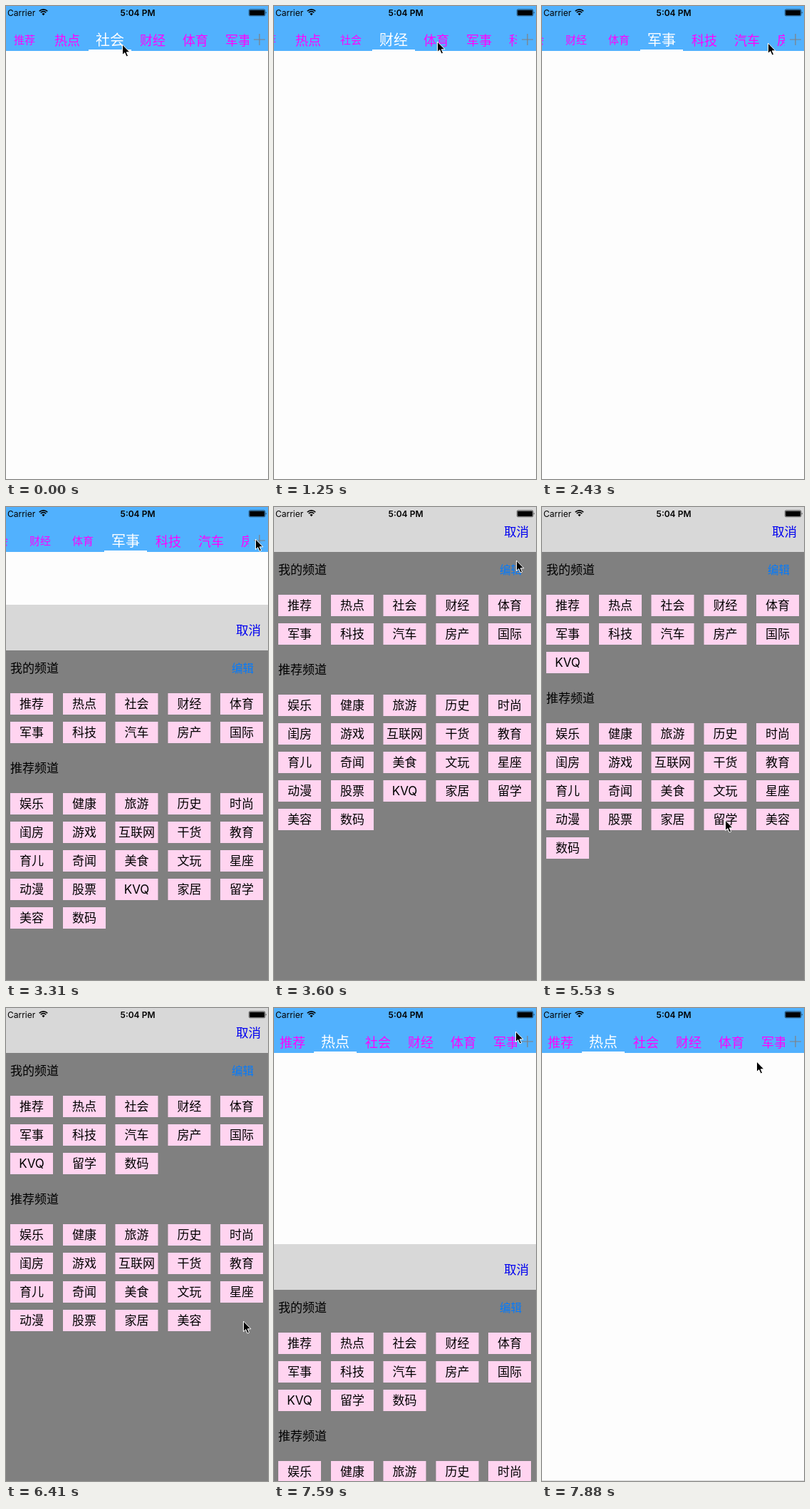
Animation of 368x663 px, one loop 8 s. Source, as an HTML page:

```html
<!DOCTYPE html>
<html lang="zh">
<head>
<meta charset="utf-8">
<style>
  html, body { margin: 0; width: 368px; height: 663px; overflow: hidden; background: #fdfdfd; }
  svg { display: block; }
  text { font-family: Inter, "Noto Sans CJK SC", "Noto Sans CJK", sans-serif; }
</style>
</head>
<body>
<svg id="stage" width="368" height="663" viewBox="0 0 368 663"></svg>
<script>
const LOOP = 8000, FIRST = 210, STEP = 147.5;
const stage = document.getElementById('stage');

const mine = '推荐 热点 社会 财经 体育 军事 科技 汽车 房产 国际'.split(' ');
const others = ('娱乐 健康 旅游 历史 时尚 闺房 游戏 互联网 干货 教育 育儿 奇闻 美食 文玩 星座 ' +
  '动漫 股票 KVQ 家居 留学 美容 数码').split(' ');

// Taps on tabs: [ms, tab]; channels moved up: [ms, name]
const taps = [[-1000, 2], [580, 3], [1330, 4], [1920, 5]];
const moves = [[4900, 'KVQ'], [5640, '留学'], [6230, '数码']];
const OPEN = 3025, CLOSE = 7385, SLIDE = 400, SCROLL = 300;

// Pointer path: [step, x, y]
const path = [
  [-1, 163, 54], [2, 204, 54], [4, 208, 53], [7, 229, 50], [10, 230, 50], [12, 232, 51],
  [15, 317, 52], [18, 350, 45], [21, 350, 45], [23, 340, 75], [27, 220, 330], [30, 191, 401],
  [32, 191, 401], [36, 257, 439], [37, 258, 439], [40, 333, 439], [43, 333, 439],
  [48, 339, 33], [50, 339, 33], [52, 301, 75]
];

const clamp = v => Math.max(0, Math.min(1, v));
const ease = v => { const u = clamp(v); return u * u * (3 - 2 * u); };
const mix = (a, b, u) => a + (b - a) * u;

const rect = (x, y, w, h, fill) =>
  `<rect x="${x}" y="${y}" width="${w}" height="${h}" fill="${fill}"/>`;

// Text centred vertically on y
const label = (str, x, y, size, fill = '#000', anchor = 'middle', weight = 400) =>
  `<text x="${x}" y="${y + size * 0.38}" font-size="${size}" fill="${fill}" ` +
  `text-anchor="${anchor}" font-weight="${weight}">${str}</text>`;

function statusBar() {
  const arc = r => {
    const d = r * 0.72;
    return `<path d="M${52.5 - d} ${13 - d}A${r} ${r} 0 0 1 ${52.5 + d} ${13 - d}"
      fill="none" stroke="#000" stroke-width="1.7"/>`;
  };
  return label('Carrier', 2, 9, 12, '#000', 'start') +
    label('5:04 PM', 185, 9, 12, '#000', 'middle', 600) +
    arc(8) + arc(5.2) + '<path d="M52.5 13.2L50.4 11A3 3 0 0 1 54.6 11Z"/>' +
    '<rect x="341.3" y="4.8" width="22.6" height="9" rx="1.6" fill="none" stroke="#000" stroke-width=".6"/>' +
    '<rect x="342.2" y="5.7" width="20.8" height="7.2" rx=".8"/>' +
    '<path d="M364.8 7.6q1.6 1.7 0 3.4z"/>';
}

function tabs(t) {
  const rebuilt = t > 3700;
  const done = taps.filter(([at]) => at <= t);
  const [at, chosen] = rebuilt ? [0, 1] : done[done.length - 1];
  const before = !rebuilt && done.length > 1 ? done[done.length - 2][1] : chosen;
  const u = ease((t - at) / SCROLL);
  const offset = i => Math.max(0, i * 60 - 142);
  const scroll = mix(offset(before), offset(chosen), u);
  const visited = rebuilt ? [] : [0, ...done.map(d => d[1])];
  const names = mine.map((name, i) => {
    const on = i === chosen;
    const size = on ? 20 : visited.includes(i) ? 15 : 18;
    return label(name, 26 + 60 * i - scroll, 47.7, size, on ? '#fff' : '#f0f');
  }).join('');
  const line = mix(before, chosen, u) * 60 - 4 - scroll;
  return rect(0, 0, 368, 63, '#51b1fe') +
    '<clipPath id="strip"><path d="M0 20H341V64H0Z"/></clipPath>' +
    `<g clip-path="url(#strip)">${names}${rect(line, 61, 60, 2, '#fff')}</g>` +
    '<path d="M348 47H364M356 39V55" stroke="#808080" stroke-width="1.2"/>';
}

const cells = (list, top) => list.map((name, i) => {
  // Columns snap to half pixels
  const x = Math.ceil((6 + 73.75 * (i % 5)) * 2) / 2, y = top + 40 * Math.floor(i / 5);
  return rect(x, y, 60, 30, '#ffd4f0') + label(name, x + 30, y + 15, 17);
}).join('');

function panel(t) {
  if (t < OPEN) return '';
  const slide = t < CLOSE ? 1 - ease((t - OPEN) / SLIDE) : ease((t - CLOSE) / SLIDE);
  const added = moves.filter(([at]) => at <= t).map(m => m[1]);
  const top = [...mine, ...added];
  const rest = others.filter(name => !added.includes(name));
  const next = 123 + 40 * Math.ceil(top.length / 5);
  return `<g transform="translate(0 ${Math.round(663 * slide)})">` +
    rect(0, -1, 368, 64, '#d8d8d8') + rect(0, 63, 368, 664, '#808080') +
    label('取消', 340.5, 34, 17.6, '#0000f0') +
    label('我的频道', 6, 88, 17, '#000', 'start') +
    label('编辑', 332.5, 88, 15.5, '#007aff') +
    cells(top, 123) +
    label('推荐频道', 6, next + 25, 17, '#000', 'start') +
    cells(rest, next + 60) + '</g>';
}

function pointer(step) {
  let i = 0;
  while (i < path.length - 2 && path[i + 1][0] <= step) i++;
  const [a, ax, ay] = path[i], [b, bx, by] = path[i + 1];
  const u = ease((step - a) / (b - a));
  return `<path transform="translate(${mix(ax, bx, u)} ${mix(ay, by, u)})"
    d="M.5 0V14.6L3.8 11.6L6.1 17L8.6 16L6.3 10.8H11Z" stroke="#fff" stroke-width="1"/>`;
}

let shown = null;
function draw(ms) {
  const t = ms % LOOP;
  const step = t < FIRST ? -1 : Math.floor((t - FIRST) / STEP + 0.1);
  if (step === shown) return;
  shown = step;
  const now = step < 0 ? 0 : FIRST + step * STEP;
  stage.innerHTML = rect(0, 0, 368, 663, '#fdfdfd') +
    tabs(now) + panel(now) + statusBar() + pointer(step);
}

const start = performance.now();
function frame() {
  draw(performance.now() - start);
  requestAnimationFrame(frame);
}
frame();
</script>
</body>
</html>
```
